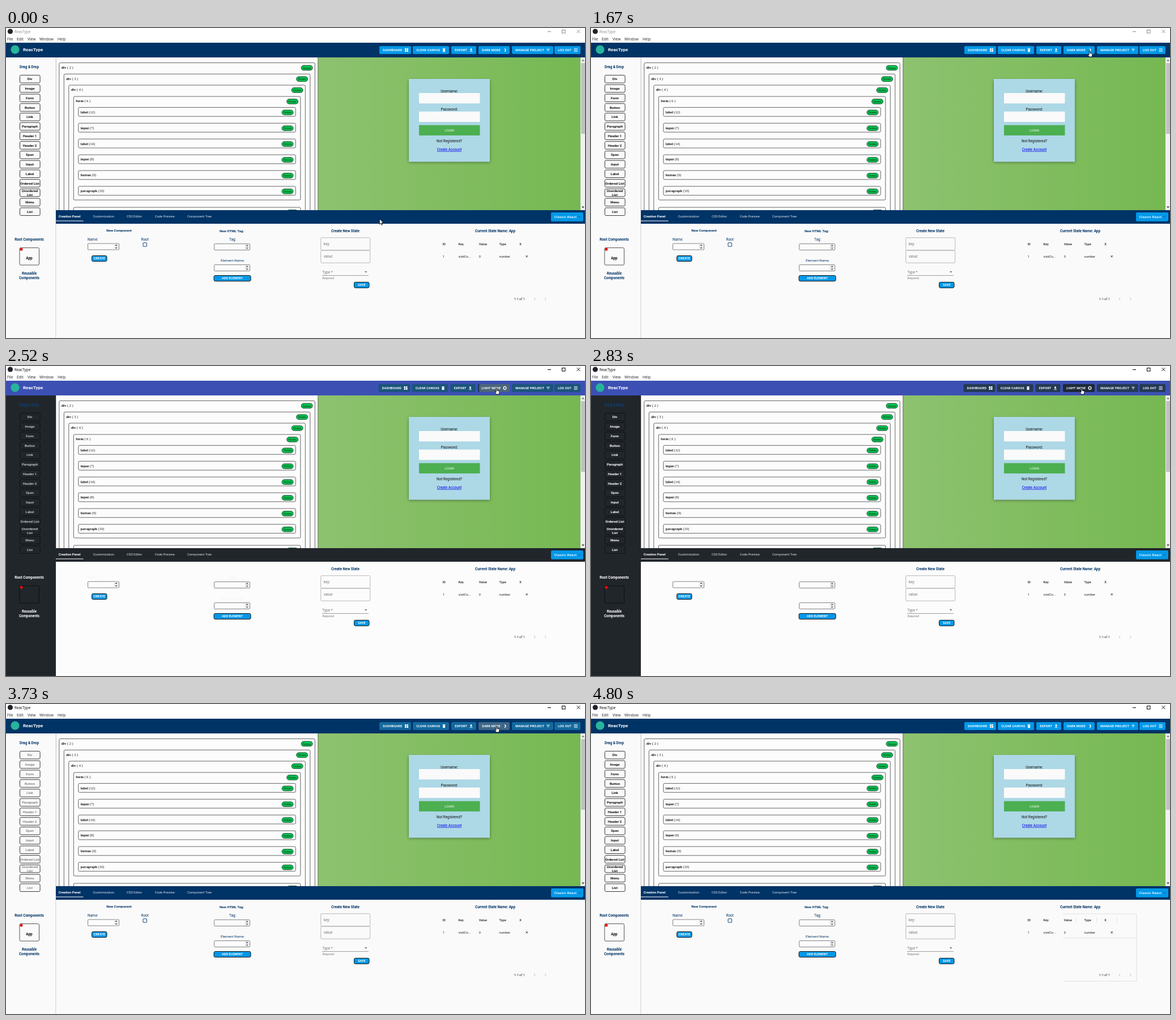
These frames come from a looping animation (1022 by 548 pixels, 5.3 s). An HTML page with a canvas:

```html
<!DOCTYPE html>
<html lang="en">
<head>
<meta charset="utf-8">
<title>ReacType</title>
<style>
html, body { margin: 0; width: 100%; height: 100%; overflow: hidden; background: #fff; }
canvas { display: block; width: 1022px; height: 548px; }
</style>
</head>
<body>
<canvas id="stage"></canvas>
<script>
const W = 1022, H = 548, LOOP = 5300;
const canvas = document.getElementById('stage');
const ctx = canvas.getContext('2d');
const dpr = window.devicePixelRatio || 1;
canvas.width = W * dpr;
canvas.height = H * dpr;

const SANS = 'Roboto, sans-serif';
const UI = '"Open Sans", sans-serif';
const SERIF = '"Liberation Serif", serif';
const ARIAL = '"Liberation Sans", sans-serif';
const NAVY = [0, 51, 102], BLUE = [2, 152, 232], WHITE = [255, 255, 255], INK = [17, 17, 17];
const DARK = '#21262b';

// pointer stops: time, x, y
const PATH = [
  [0, 659, 337], [120, 590, 285], [240, 480, 225], [370, 350, 194], [490, 220, 205],
  [610, 141, 270], [730, 230, 350], [850, 420, 369], [970, 640, 340], [1090, 815, 278],
  [1210, 880, 135], [1330, 896, 74], [1450, 896, 44], [1560, 893, 41], [1670, 880, 40],
  [1790, 866, 39], [4450, 880, 64], [4570, 925, 230], [4690, 985, 440], [4800, -50, -50]
];
// further moments at which the picture is renewed
const TICKS = [1910, 2290, 2410, 2520, 2620, 2730, 2830, 3470, 3590, 3730, 3850, 3970, 4090];
const TIMES = PATH.map(p => p[0]).concat(TICKS).sort((a, b) => a - b);

const clamp = v => Math.max(0, Math.min(1, v));
const rgb = c => `rgb(${c.map(Math.round).join(',')})`;
const mix = (a, b, k) => a.map((v, i) => v + (b[i] - v) * k);
const last = (list, ok) => list.filter(ok).pop();

function rect(x, y, w, h, fill) {
  ctx.fillStyle = fill;
  ctx.fillRect(x, y, w, h);
}

function box(x, y, w, h, r, fill, stroke, line = 1) {
  ctx.beginPath();
  ctx.roundRect(x, y, w, h, r);
  if (fill) { ctx.fillStyle = fill; ctx.fill(); }
  if (stroke) { ctx.strokeStyle = stroke; ctx.lineWidth = line; ctx.stroke(); }
}

function disc(x, y, r, fill) {
  ctx.beginPath();
  ctx.arc(x, y, r, 0, Math.PI * 2);
  ctx.fillStyle = fill;
  ctx.fill();
}

function line(points, color, width = 1) {
  ctx.beginPath();
  points.forEach(([x, y], i) => i ? ctx.lineTo(x, y) : ctx.moveTo(x, y));
  ctx.strokeStyle = color;
  ctx.lineWidth = width;
  ctx.stroke();
}

function poly(points, fill) {
  ctx.beginPath();
  points.forEach(([x, y]) => ctx.lineTo(x, y));
  ctx.closePath();
  ctx.fillStyle = fill;
  ctx.fill();
}

// y is the middle of the capitals
function text(s, x, y, size, color, { weight = 400, font = SANS, align = 'left', gap = 0 } = {}) {
  ctx.font = `${weight} ${size}px ${font}`;
  ctx.letterSpacing = gap + 'px';
  ctx.textAlign = align;
  ctx.fillStyle = color;
  ctx.fillText(s, x, y + size * 0.36);
  const width = ctx.measureText(s).width;
  ctx.letterSpacing = '0px';
  return width;
}

const bold = (s, x, y, size, color) => text(s, x, y, size, color, { weight: 700, align: 'center' });
const mid = (s, x, y, size, color) => text(s, x, y, size, color, { align: 'center' });

function titleBar(active) {
  const c = active ? '#000' : '#8a8a8a';
  rect(0, 0, W, 26, '#fff');
  disc(7.5, 6, 4.6, '#20232a');
  text('ReacType', 15, 6.2, 6.4, c, { font: UI });
  [['File', 2], ['Edit', 19], ['View', 38], ['Window', 59], ['Help', 91]]
    .forEach(([s, x]) => text(s, x, 20, 6.6, '#222', { font: UI }));
  line([[956, 6.5], [962, 6.5]], c);
  ctx.strokeRect(981.5, 3.5, 5.5, 5.5);
  line([[1007.5, 3], [1013.5, 9]], c, 0.9);
  line([[1013.5, 3], [1007.5, 9]], c, 0.9);
}

const ICONS = {
  grid(x, y) {
    rect(x - 3, y - 3, 2.6, 3.4, '#fff');
    rect(x - 3, y + 1, 2.6, 2, '#fff');
    rect(x + 0.4, y - 3, 2.6, 2, '#fff');
    rect(x + 0.4, y - 0.4, 2.6, 3.4, '#fff');
  },
  trash(x, y) {
    rect(x - 2.4, y - 3, 4.8, 1, '#fff');
    rect(x - 2, y - 1.6, 4, 4.8, '#fff');
  },
  load(x, y) {
    rect(x - 0.9, y - 3, 1.8, 2.4, '#fff');
    poly([[x - 2.4, y - 0.8], [x + 2.4, y - 0.8], [x, y + 1.6]], '#fff');
    rect(x - 2.5, y + 2.2, 5, 0.9, '#fff');
  },
  moon(x, y) {
    ctx.beginPath();
    ctx.arc(x - 1, y, 3.1, -Math.PI / 2, Math.PI / 2);
    ctx.quadraticCurveTo(x + 1.8, y, x - 1, y - 3.1);
    ctx.fillStyle = '#fff';
    ctx.fill();
  },
  gear(x, y) {
    ctx.beginPath();
    for (let i = 0; i < 16; i++) {
      const a = i * Math.PI / 8, r = i % 2 ? 2.8 : 3.7;
      ctx.lineTo(x + r * Math.cos(a), y + r * Math.sin(a));
    }
    ctx.closePath();
    ctx.moveTo(x + 1.8, y);
    ctx.arc(x, y, 1.8, 0, Math.PI * 2);
    ctx.fillStyle = '#fff';
    ctx.fill('evenodd');
  },
  filter(x, y) {
    [3, 2, 0.9].forEach((r, i) => rect(x - r, y - 2.2 + i * 1.8, r * 2, 0.8, '#fff'));
  },
  exit(x, y) {
    line([[x - 2.5, y - 1.2], [x - 2.5, y - 2.6], [x + 2.6, y - 2.6], [x + 2.6, y + 2.6], [x - 2.5, y + 2.6], [x - 2.5, y + 1.2]], '#fff', 0.8);
    line([[x - 3, y], [x + 1, y]], '#fff', 0.8);
    line([[x - 0.5, y - 1.5], [x + 1, y], [x - 0.5, y + 1.5]], '#fff', 0.8);
  }
};

function ripple(age, x, w) {
  if (age < 0 || age > 440) return;
  ctx.save();
  ctx.beginPath();
  ctx.roundRect(x, 32, w, 14, 2);
  ctx.clip();
  const alpha = 0.28 * (1 - clamp((age - 180) / 260));
  disc(866, 39, 8 + age * 0.1, `rgba(255,255,255,${alpha})`);
  ctx.restore();
}

function header(t, dark, k) {
  rect(0, 26, W, 26, dark ? '#3c50b4' : rgb(NAVY));
  disc(16, 38.2, 7.6, '#27b49c');
  text('ReacType', 30, 38.3, 8, '#fff', { weight: 700 });

  const base = mix(BLUE, [36, 58, 84], k);
  const over = mix([6, 92, 154], [28, 41, 56], k);
  const hover = t >= 1790 && t < 4570 ? (t === 1790 || t === 4450 ? 0.5 : 1) : 0;
  const off = dark ? -1.5 : 0;
  const list = [
    ['DASHBOARD', 659 + off, 56, 'grid', 707 + off, 0],
    ['CLEAR CANVAS', 718 + off, 64, 'trash', 773 + off, 0],
    ['EXPORT', 786 + off, 44, 'load', 821 + off, 0],
    [dark ? 'LIGHT MODE' : 'DARK MODE', dark ? 833 : 834, dark ? 56 : 55, dark ? 'gear' : 'moon', 880.5, hover],
    ['MANAGE PROJECT', 893, 73, 'filter', 957, t === 1450 || t === 1560 ? 0.7 : 0],
    ['LOG OUT', 968, 46, 'exit', 1005.5, 0]
  ];
  list.forEach(([label, x, w, icon, ix, h], i) => {
    box(x, 32, w, 14, 2, rgb(mix(base, over, h)));
    if (i === 3) {
      ripple(t - 2290, x, w);
      ripple(t - 3470, x, w);
    }
    text(label, x + 6.2, 39.2, 5.55, '#fff', { weight: 700, gap: 0.16 });
    ICONS[icon](ix, 39);
  });
}

function sidebar(dark, k) {
  rect(0, 52, 88, H - 52, dark ? DARK : '#fafafa');
  if (!dark) rect(87.5, 52, 1, H - 52, '#d8d8d8');
  const ink = rgb(mix(INK, WHITE, k));
  const head = dark ? '#fff' : rgb(NAVY);
  bold('Drag & Drop', 41, 69, 6.3, dark ? '#0b4377' : rgb(NAVY));
  const items = 'Div,Image,Form,Button,Link,Paragraph,Header 1,Header 2,Span,Input,Label,Ordered List,Unordered List,Menu,List';
  items.split(',').forEach((s, i) => {
    const y = 90.2 + i * 16.75;
    box(24.5, y - 6.8, 35.6, 13.6, 2, dark ? DARK : '#fafafa', dark ? '#0f1215' : '#3a3a3a');
    if (i === 12) {
      bold('Unordered', 42, y - 3.5, 6.05, ink);
      bold('List', 42, y + 3.7, 6.05, ink);
    } else bold(s, 42, y, 6.05, ink);
  });
  bold('Root Components', 41, 374, 6.4, head);
  box(24, 388.5, 34.5, 30.5, 2, dark ? DARK : '#fafafa', dark ? '#0c0e10' : '#555');
  disc(27, 391.2, 2.5, '#f00c0c');
  if (!dark) bold('App', 41, 406.6, 6.4, '#111');
  bold('Reusable', 41, 434, 6.3, head);
  bold('Components', 41, 441.6, 6.3, head);
}

function node(name, id, x, y, right, height, textDy) {
  box(x, y, right - x, height, 2, null, '#555', 0.9);
  const w = text(name, x + 4, y + textDy, 6.4, '#111', { weight: 700, font: SERIF });
  text(' ' + id, x + 4 + w, y + textDy, 6.4, '#111', { font: SERIF });
  box(right - 24.2, y + textDy - 3.4, 20, 8.6, 4.3, '#0cc352', '#17402a', 0.9);
  text('Notes', right - 14.2, y + textDy + 1, 5.6, '#06331a', { font: ARIAL, align: 'center' });
}

function tree() {
  ctx.save();
  ctx.beginPath();
  ctx.rect(88, 52, 463, 270);
  ctx.clip();
  rect(88, 52, 463, 270, '#fcfcfc');
  rect(88, 52, 1, 270, '#ccc');
  node('div', '( 2 )', 93.8, 61.5, 545.3, 300, 8);
  node('div', '( 3 )', 102.3, 81.3, 536.8, 300, 8);
  node('div', '( 4 )', 110.8, 101, 528.3, 300, 8);
  node('form', '( 6 )', 119.3, 121, 519.8, 183, 8);
  [['label', 12], ['input', 7], ['label', 14], ['input', 8], ['button', 9], ['paragraph', 10]]
    .forEach(([s, n], i) => node(s, `(${n})`, 127.8, 140.4 + i * 27.9, 511.2, 15.8, 8));
  node('', '', 119.3, 317, 519.8, 60, 8);
  ctx.restore();
}

function preview() {
  const g = ctx.createLinearGradient(551, 0, 1014, 0);
  g.addColorStop(0, '#8dc26f');
  g.addColorStop(1, '#76b852');
  rect(551, 52, 463, 270, g);
  rect(550.3, 52, 1, 270, '#5d6b55');
  ctx.save();
  ctx.shadowColor = 'rgba(0,0,0,.4)';
  ctx.shadowBlur = 5 * dpr;
  ctx.shadowOffsetY = 1.5 * dpr;
  rect(711, 90, 143, 146.5, '#add8e6');
  ctx.restore();
  mid('Username:', 782.5, 111.3, 6.4, '#111');
  rect(729, 115, 107.5, 18.3, '#fafafa');
  mid('Password:', 782.5, 143.8, 6.4, '#111');
  rect(729, 147.7, 107.5, 18.3, '#fafafa');
  rect(729, 171.7, 107.5, 18.2, '#4caf50');
  mid('LOGIN', 782.5, 181, 5.8, '#fff');
  mid('Not Registered?', 782.5, 200, 6.35, '#111');
  mid('Create Account', 782.5, 215, 6.35, '#00e');
  rect(761, 217.8, 43, 0.7, '#00e');
  rect(1014, 52, 8, 270, '#f1f1f1');
  rect(1015, 62, 7, 125, '#c1c1c1');
  poly([[1016, 58.5], [1021, 58.5], [1018.5, 55.5]], '#777');
  poly([[1016, 315.5], [1021, 315.5], [1018.5, 318.5]], '#444');
}

function tabs(dark) {
  rect(88, 322, W - 88, 24, dark ? DARK : rgb(NAVY));
  text('Creation Panel', 92.7, 332.5, 5.9, '#fff', { weight: 700 });
  [['Customization', 153.5], ['CSS Editor', 213], ['Code Preview', 262.7], ['Component Tree', 320]]
    .forEach(([s, x]) => text(s, x, 332.5, 5.8, '#dde3ea'));
  rect(88, 340.5, 48.5, 1, '#fff');
  box(962, 326, 57, 15.8, 2, rgb(BLUE));
  text('Classic React', 967.5, 333.7, 6.2, '#fff', { weight: 500, gap: 0.17 });
  line([[1010.3, 332.7], [1012, 334.5], [1013.7, 332.7]], '#0b4d80', 0.9);
}

function spinBox(x, y, w) {
  box(x + 0.5, y + 0.5, w - 1, 11, 1, '#fcfcfc', '#767676', 0.9);
  const cx = x + w - 5.5;
  rect(cx - 4, y + 1.2, 8, 9.6, '#ececec');
  poly([[cx - 2, y + 4.4], [cx + 2, y + 4.4], [cx, y + 2.2]], '#444');
  poly([[cx - 2, y + 7.4], [cx + 2, y + 7.4], [cx, y + 9.6]], '#444');
}

function action(s, x, y, w) {
  box(x + 0.5, y + 0.5, w - 1, 10, 2.2, rgb(BLUE), '#111');
  text(s, x + w / 2, y + 5.5, 5.4, '#fff', { weight: 700, align: 'center', gap: 0.1 });
}

function panel(t, dark, k) {
  const navy = rgb(NAVY);
  rect(88, 346, W - 88, H - 346, dark ? '#fcfcfc' : '#fafafa');
  if (!dark) {
    rect(87.5, 346, 1, H - 346, '#d8d8d8');
    bold('New Component', 199.5, 357.5, 6, navy);
    bold('New HTML Tag:', 398.5, 359, 6, navy);
    text('Root', 238.5, 374, 6.4, navy);
    box(242, 379.7, 6.4, 6.4, 0.5, null, '#0b4377', 1);
  }
  if (!dark || k < 1) {
    const c = dark ? '#eff3f5' : navy;
    text('Name:', 144, 373.3, 6.4, c);
    mid('Tag:', 400, 374, 6.3, c);
    mid('Element Name:', 400, 411, 6.2, c);
  }
  spinBox(144, 380.5, 56);
  action('CREATE', 151, 402, 27.5);
  spinBox(367, 381, 64);
  spinBox(367, 418, 64);
  action('ADD ELEMENT', 366.5, 437, 66);

  bold('Create New State', 599, 358.6, 6.4, navy);
  box(555.7, 370.7, 87, 22, 1.5, null, '#b0b0b0', 0.9);
  box(555.7, 393.2, 87, 22, 1.5, null, '#b0b0b0', 0.9);
  text('key:', 560.8, 382, 6.4, '#777');
  text('value:', 560.8, 404, 6.4, '#777');
  text('Type *', 558.2, 431.8, 6.4, '#777', { gap: 0.1 });
  poly([[633, 430.3], [637.4, 430.3], [635.2, 432.6]], '#555');
  rect(558, 437, 82, 0.8, '#888');
  text('Required', 558.5, 442.4, 5, '#777', { gap: 0.1 });
  action('SAVE', 614, 448.8, 27.5);

  bold('Current State Name: App', 863.5, 358.6, 6.35, navy);
  if (t >= 4570) {
    line([[833, 371], [963, 371], [963, 490], [833, 490]], '#dedede', 0.9);
    rect(833, 413.5, 130, 0.9, '#e0e0e0');
    [856, 892, 928].forEach(x => rect(x, 377, 0.8, 9, '#e0e0e0'));
  }
  const cols = [770.7, 798.5, 834.7, 870.5, 906.3];
  ['ID', 'Key', 'Value', 'Type', 'X'].forEach((s, i) => text(s, cols[i], 382, 5.7, '#222', { weight: 500 }));
  ['1', 'visitCo...', '0', 'number'].forEach((s, i) => text(s, cols[i], 403.8, 5.7, '#222'));
  line([[917.5, 402], [921, 405.5]], '#222', 0.9);
  line([[921, 402], [917.5, 405.5]], '#222', 0.9);
  text('1-1 of 1', 896.7, 479, 5.7, '#222');
  line([[934.2, 476.8], [932.2, 479], [934.2, 481.2]], '#aaa', 0.8);
  line([[951.2, 476.8], [953.2, 479], [951.2, 481.2]], '#aaa', 0.8);
}

function pointer(t) {
  const [, x, y] = last(PATH, p => p[0] <= t);
  const shape = new Path2D(t >= 1450 && t < 4450
    ? 'M-.9 .8Q0-.4 .9 .8V4.4L4.3 5.2Q5.2 5.6 5 6.8L4.2 11H-.5L-3 7.4Q-2.6 6.2-.9 7.4Z'
    : 'M.3 .3V10L2.5 7.9L4 11.4L5.5 10.7L4 7.4H7Z');
  ctx.save();
  ctx.translate(x, y);
  ctx.fillStyle = '#fff';
  ctx.strokeStyle = '#000';
  ctx.lineWidth = 0.85;
  ctx.fill(shape);
  ctx.stroke(shape);
  ctx.restore();
}

function draw(now) {
  const t = last(TIMES, v => v <= now);
  const dark = t >= 2520 && t < 3730;
  const k = t < 3000 ? clamp((t - 2440) / 110) : 1 - clamp((t - 3670) / 120);
  ctx.setTransform(dpr, 0, 0, dpr, 0, 0);
  titleBar(t >= 2290);
  header(t, dark, k);
  sidebar(dark, k);
  tree();
  preview();
  panel(t, dark, k);
  tabs(dark);
  pointer(t);
}

const start = performance.now();
function loop() {
  draw((performance.now() - start) % LOOP);
  requestAnimationFrame(loop);
}
loop();
</script>
</body>
</html>
```
